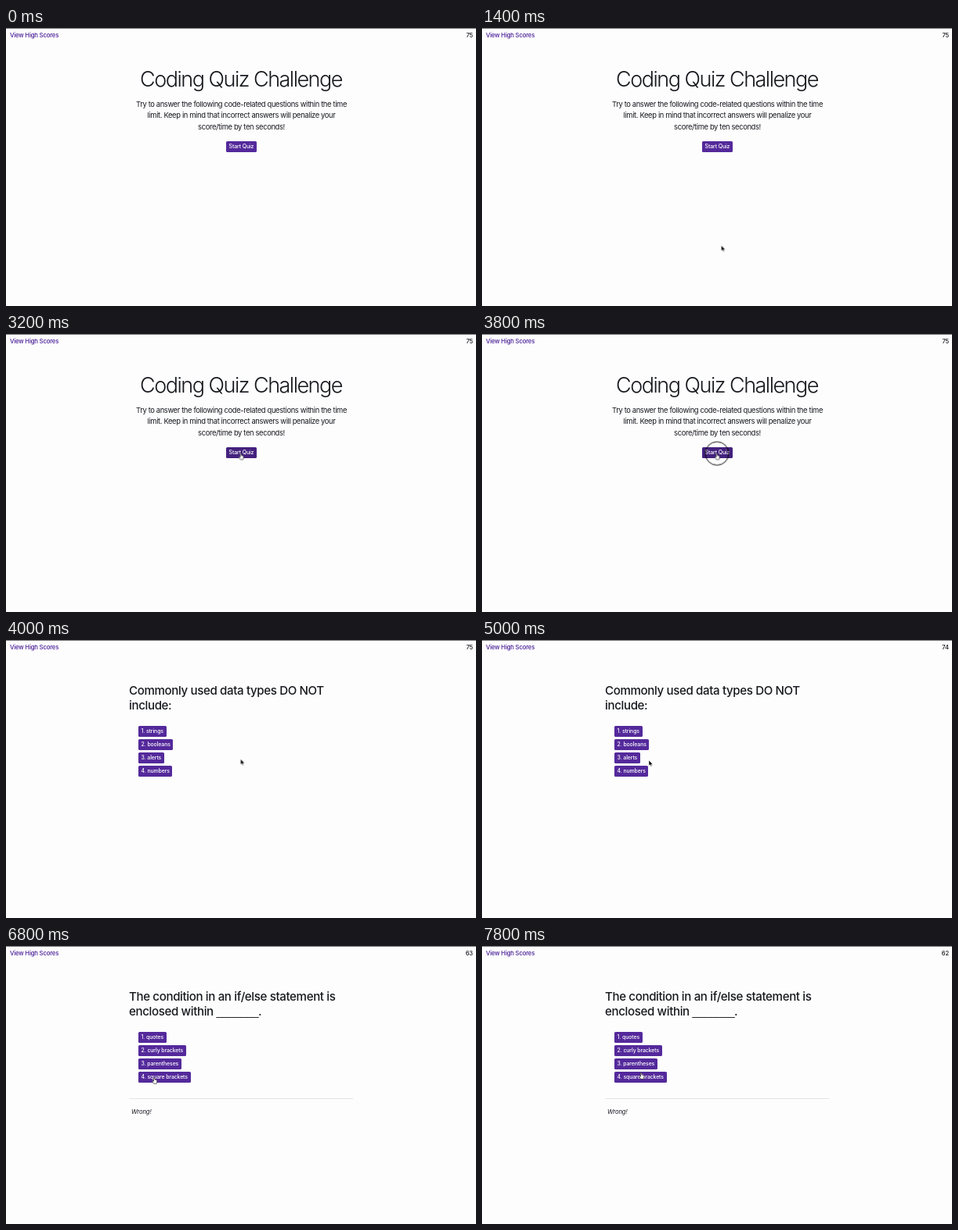
Animation, 600 px wide and 356 px high, one loop 8 s. Source, as an HTML page:

```html
<!DOCTYPE html>
<html lang="en">
<head>
<meta charset="utf-8">
<title>Coding Quiz</title>
<style>
  html, body { margin: 0; width: 100%; height: 100%; overflow: hidden; }
  body {
    position: relative; background: #fdfdfe; color: #17191d;
    font: 7.7px/12px Inter, sans-serif; font-optical-sizing: none;
    letter-spacing: -.1px; white-space: nowrap;
    --purple: #54299b; --dark: #44217e;
  }
  body * { animation: 8s step-end infinite; }
  .abs, section, section > * { position: absolute; margin: 0; }
  section { inset: 0; }

  .rule { inset: 0 0 auto; height: 1px; background: #77777a; }
  .link, .timer { top: 4px; font-weight: 500; letter-spacing: -.17px; }
  .link { left: 5px; color: #461a94; }
  .timer { right: 4px; height: 12px; overflow: hidden; text-align: right; }
  .timer div { animation-name: count; }

  h1 {
    left: 0; width: 600px; top: 50px; text-align: center;
    font-size: 27px; line-height: 32px; font-weight: 350; letter-spacing: -1.5px;
  }
  .lead {
    left: 0; width: 601px; top: 90.5px; text-align: center;
    font-size: 9.4px; line-height: 14.7px; letter-spacing: -.36px;
  }
  h2 {
    left: 157px; top: 56px;
    font-size: 15.1px; line-height: 18.8px; font-weight: 500; letter-spacing: -.37px;
  }
  .blank { font: 400 15.1px/1 "Liberation Sans", sans-serif; letter-spacing: -.75px; }
  .btn {
    display: block; width: max-content; height: 14px; padding: 0 3.6px; border-radius: 1.6px;
    background: var(--purple); color: #fff;
    font-size: 6.9px; font-weight: 500; line-height: 14.4px; letter-spacing: -.1px;
  }
  .go { left: 281px; top: 145.3px; animation-name: hoverGo; }
  .answers { left: 169px; top: 109.8px; display: grid; gap: 3px; }
  .picked { animation-name: hoverPick; }
  .line { left: 157px; top: 195px; width: 286px; height: 1px; background: #e4e4e6; }
  .verdict { left: 160px; top: 207px; font-style: italic; }

  .intro { animation-name: intro; }
  .first { animation-name: first; }
  .second { animation-name: second; }

  .cursor { left: 0; top: 0; animation-name: move; }
  .cursor svg { position: absolute; overflow: visible; width: 1px; height: 1px; stroke-linejoin: round; }
  .arrow { animation-name: arrow; }
  .hand { animation-name: hand; }
  .ring {
    left: -15.5px; top: -15.5px; width: 29px; height: 29px;
    border: 1px solid #000; border-radius: 50%; animation-name: ring;
  }

  @keyframes intro  { 0% { visibility: visible } 50%, 100% { visibility: hidden } }
  @keyframes first  { 0% { visibility: hidden } 50% { visibility: visible } 85%, 100% { visibility: hidden } }
  @keyframes second { 0% { visibility: hidden } 85%, 100% { visibility: visible } }
  @keyframes hoverGo   { 40%, 100% { background: var(--dark) } }
  @keyframes hoverPick { 72.5%, 100% { background: var(--dark) } }
  @keyframes count {
    0% { transform: none }
    62.5% { transform: translateY(-12px) }
    75% { transform: translateY(-24px) }
    85% { transform: translateY(-36px) }
    87.5%, 100% { transform: translateY(-48px) }
  }
  @keyframes arrow {
    0% { opacity: 0 } 15% { opacity: 1 } 40% { opacity: 0 }
    50% { opacity: 1 } 72.5%, 100% { opacity: 0 }
  }
  @keyframes hand {
    0% { opacity: 0 } 40% { opacity: 1 } 50% { opacity: 0 } 72.5%, 100% { opacity: 1 }
  }
  @keyframes ring {
    0% { opacity: 0 } 47.5% { opacity: 1 } 50% { opacity: 0 }
    82.5% { opacity: 1 } 85%, 100% { opacity: 0 }
  }
  /* One step is 200 ms */
  @keyframes move {
    0% { transform: translate(307px, 297px) }
    15% { transform: translate(307px, 297px); animation-timing-function: steps(2) }
    20% { transform: translate(304px, 260px); animation-timing-function: steps(3) }
    27.5% { transform: translate(298.5px, 166px); animation-timing-function: steps(1) }
    30% { transform: translate(297.5px, 153px) }
    40% { transform: translate(299.5px, 152.5px) }
    55% { transform: translate(299.5px, 152.5px); animation-timing-function: steps(3) }
    62.5% { transform: translate(213px, 154px); animation-timing-function: steps(4) }
    72.5% { transform: translate(189px, 168px) }
    90% { transform: translate(189px, 168px); animation-timing-function: steps(3) }
    97.5%, 100% { transform: translate(203px, 162px) }
  }
</style>
</head>
<body>
  <div class="abs rule"></div>
  <div class="abs link">View High Scores</div>
  <div class="abs timer"><div>75<br>74<br>73<br>63<br>62</div></div>

  <section class="intro">
    <h1>Coding Quiz Challenge</h1>
    <p class="lead">Try to answer the following code-related questions within the time<br>limit. Keep in mind that incorrect answers will penalize your<br>score/time by ten seconds!</p>
    <span class="btn go">Start Quiz</span>
  </section>

  <section class="first">
    <h2>Commonly used data types DO NOT<br>include:</h2>
    <div class="answers">
      <span class="btn">1. strings</span>
      <span class="btn">2. booleans</span>
      <span class="btn">3. alerts</span>
      <span class="btn picked">4. numbers</span>
    </div>
  </section>

  <section class="second">
    <h2>The condition in an if/else statement is<br>enclosed within <span class="blank">_______</span>.</h2>
    <div class="answers">
      <span class="btn">1. quotes</span>
      <span class="btn">2. curly brackets</span>
      <span class="btn">3. parentheses</span>
      <span class="btn">4. square brackets</span>
    </div>
    <div class="line"></div>
    <div class="verdict">Wrong!</div>
  </section>

  <div class="abs cursor">
    <div class="abs ring"></div>
    <svg class="arrow"><path d="M0 0V7L1.6 5.6L2.7 8L3.8 7.5L2.8 5.2H5Z" fill="#000" stroke="#fff" stroke-width=".5"/></svg>
    <svg class="hand"><path d="M-.7 .3Q0-.5 .6 .3L1 3L3 3.4Q4 3.6 3.9 5L3.2 8.3H-.4L-2.3 5.3Q-2.2 4.3-1.2 4.8L-.4 5.3Z" fill="#fff" stroke="#111" stroke-width=".6"/></svg>
  </div>
</body>
</html>
```
